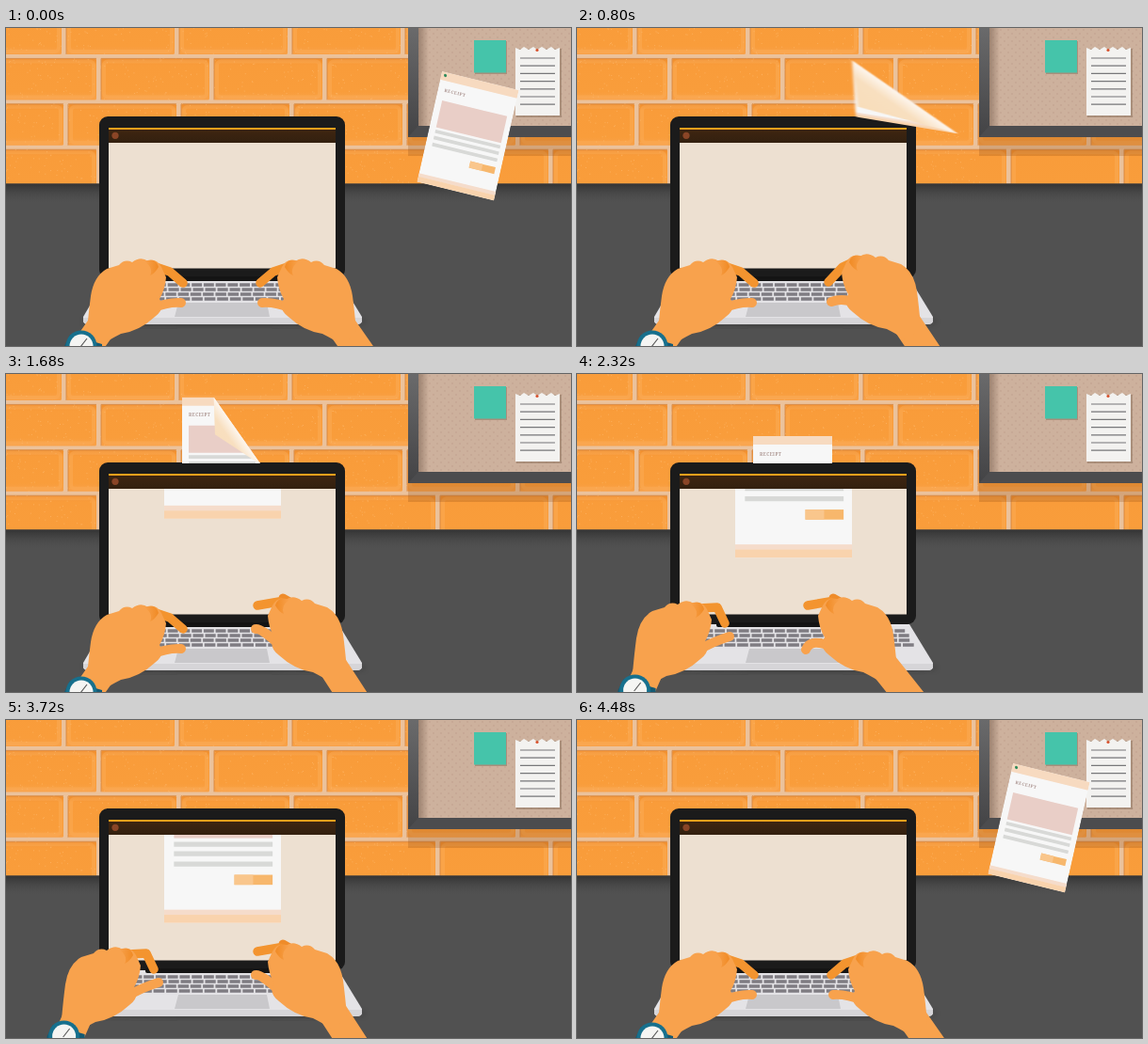
Recreate the animation shown at these times as an HTML page. Size 600 by 338 pixels, loop 4.52 s.

```html
<!DOCTYPE html>
<html lang="en">
<head>
<meta charset="utf-8">
<title>Receipt into laptop</title>
<style>
html, body { margin: 0; width: 100%; height: 100%; overflow: hidden; background: #515151; }
svg { display: block; width: 100vw; height: 100vh; }
</style>
</head>
<body>
<svg viewBox="0 0 600 338" preserveAspectRatio="none">
  <defs>
    <linearGradient id="brick" x2="0" y2="1">
      <stop stop-color="#ee8d2e"/><stop offset=".15" stop-color="#f99c3a"/>
      <stop offset=".8" stop-color="#f99d3b"/><stop offset="1" stop-color="#f8a149"/>
    </linearGradient>
    <linearGradient id="bar" x2="0" y2="1">
      <stop stop-color="#402611"/><stop offset="1" stop-color="#33200f"/>
    </linearGradient>
    <linearGradient id="frameSide" x2="0" y2="1">
      <stop stop-color="#6a6a6b"/><stop offset="1" stop-color="#434345"/>
    </linearGradient>
    <linearGradient id="corkShade">
      <stop stop-color="#6d5545" stop-opacity=".5"/><stop offset="1" stop-color="#6d5545" stop-opacity="0"/>
    </linearGradient>
    <linearGradient id="deskShade" x2="0" y2="1">
      <stop stop-color="#343434"/><stop offset=".4" stop-color="#434343" stop-opacity=".8"/>
      <stop offset="1" stop-color="#515151" stop-opacity="0"/>
    </linearGradient>
    <linearGradient id="flap" x1="1" y1="0" x2="0" y2="1">
      <stop stop-color="#fff"/><stop offset=".5" stop-color="#fdf6ee"/>
      <stop offset=".64" stop-color="#f8dfbf"/><stop offset="1" stop-color="#f8dcb8"/>
    </linearGradient>
    <linearGradient id="finger">
      <stop stop-color="#f8a24d"/><stop offset="1" stop-color="#f08a24"/>
    </linearGradient>
    <pattern id="dots" width="8" height="8" patternUnits="userSpaceOnUse">
      <circle cx="2" cy="2" r=".7" fill="#b39380"/><circle cx="6" cy="6" r=".7" fill="#b39380"/>
    </pattern>
    <filter id="soft" x="-20%" y="-50%" width="140%" height="200%"><feGaussianBlur stdDeviation="3"/></filter>
    <clipPath id="screenClip"><rect x="109" y="122" width="241" height="133"/></clipPath>
    <clipPath id="slotClip"><rect y="-300" width="600" height="395"/></clipPath>
    <clipPath id="foldClip"><polygon id="foldShape"/></clipPath>
    <g id="receipt">
      <rect width="84" height="120" fill="#f7f7f7"/>
      <rect width="84" height="9" fill="#f7dac0"/>
      <text x="7" y="20.5" font-family="'Noto Serif', serif" font-weight="700" font-size="4.6"
        letter-spacing=".45" fill="#ab9490">RECEIPT</text>
      <rect x="7" y="30" width="71" height="29" fill="#e9cec7"/>
      <path d="M7 63.4H78M7 70.2H78M7 77.6H78" stroke="#d8d9d7" stroke-width="3.6"/>
      <rect x="50.5" y="85.4" width="27.5" height="7.2" fill="#f7b76c"/>
      <rect x="50.5" y="85.4" width="13.5" height="7.2" fill="#f9c68c"/>
      <rect y="110.5" width="84" height="4" fill="#f5dccb"/>
      <rect y="114.2" width="84" height="5.8" fill="#f9d3ad"/>
    </g>
  </defs>

  <rect width="600" height="166" fill="#ebc29c"/>
  <g id="wall"></g>
  <path id="specks" stroke="#ffc27c" stroke-width=".9" opacity=".6"/>
  <rect y="165.5" width="600" height="173" fill="#515151"/>
  <rect y="165.5" width="600" height="22" fill="url(#deskShade)"/>

  <rect x="427" y="116" width="173" height="20" fill="#8a4a12" opacity=".24"/>
  <rect x="427" width="173" height="116" fill="#4c4c4e"/>
  <path d="M427 0H438V104L427 116Z" fill="url(#frameSide)"/>
  <rect x="438" width="162" height="104" fill="#cdb19d"/>
  <rect x="438" width="162" height="104" fill="url(#dots)" opacity=".7"/>
  <rect x="438" width="11" height="104" fill="url(#corkShade)"/>
  <rect x="498" y="14" width="34" height="35" fill="#775c49" opacity=".4"/>
  <rect x="497" y="13" width="34" height="34.5" fill="#45c4aa"/>
  <path d="M542 22H590V95H542Z" fill="#775c49" opacity=".4"/>
  <path d="M541 21l5 2 4-3 5 3 5-3 4 3 5-3 5 3 5-3 4 3 5-2V93H541Z" fill="#f3f2f0"/>
  <path id="noteLines" stroke="#77777a" stroke-width="1.2"/>
  <circle cx="564" cy="23.5" r="1.6" fill="#d9532f"/>

  <g id="laptop">
    <ellipse cx="232" cy="312" rx="150" ry="4" fill="#222" opacity=".5" filter="url(#soft)"/>
    <path d="M106 266H353L378 307V311Q378 315 372 315H88Q82 315 82 311V307Z" fill="#e4e3e6"/>
    <path d="M82 308H378V311Q378 315 372 315H88Q82 315 82 311Z" fill="#d6d5d8"/>
    <path id="keys" fill="#7f7c82"/>
    <path d="M183 292H277L280 307H179Z" fill="#c9c8cb"/>
    <rect x="99" y="94" width="261" height="172" rx="9" fill="#1b1b1b"/>
    <rect x="148" y="264" width="164" height="5" rx="2" fill="#141414"/>
    <rect x="109" y="106" width="241" height="149.5" fill="#ede0d1"/>
    <rect x="109" y="106" width="241" height="16" fill="url(#bar)"/>
    <rect x="109" y="106" width="241" height="2" fill="#f5a01c"/>
    <circle cx="116" cy="114.3" r="3.6" fill="#8a4526"/>
    <g clip-path="url(#screenClip)"><use href="#receipt" id="page"/></g>
  </g>

  <g id="slot">
    <g id="paper">
      <g clip-path="url(#foldClip)"><use href="#receipt"/></g>
      <polygon id="flapShape" fill="url(#flap)"/>
      <circle id="pin" cx="4.5" cy="3.5" r="1.6" fill="#2f8a5c"/>
    </g>
  </g>

  <g id="left"></g>
  <g id="right" transform="translate(458) scale(-1 1)"></g>
</svg>
<script>
const LOOP = 4520;
const $ = id => document.getElementById(id);
const set = (el, attrs) => { for (const k in attrs) el.setAttribute(k, attrs[k]); };
const add = (parent, tag, attrs) => {
  const el = document.createElementNS('http://www.w3.org/2000/svg', tag);
  set(el, attrs);
  return parent.appendChild(el);
};
const mix = (a, b, u) => a + (b - a) * u;
const linear = (t, from, to) => Math.min(1, Math.max(0, (t - from) / (to - from)));
const ramp = (t, from, to) => { const u = linear(t, from, to); return u * u * (3 - 2 * u); };

function buildScenery() {
  for (let row = 0; row < 4; row++) {
    const y = -16 + row * 48.4;
    for (let x = row % 2 ? -139 : -176 + row; x < 600; x += 120) {
      add($('wall'), 'rect', { x, y, width: 115, height: 44, rx: 1.5, fill: 'url(#brick)' });
      add($('wall'), 'rect', { x: x + 3, y: y + 3, width: 109, height: 38, rx: 4,
        fill: 'none', stroke: '#fbb163', 'stroke-width': 4, opacity: .35 });
      add($('wall'), 'path', { d: `M${x} ${y + 44}V${y}H${x + 115}`, fill: 'none', stroke: '#d98d4a' });
    }
  }
  let seed = 7, d = '';
  const rnd = () => (seed = seed * 16807 % 2147483647) / 2147483647;
  for (let i = 0; i < 900; i++) d += `M${(rnd() * 427).toFixed(1)} ${(rnd() * 165).toFixed(1)}h.9`;
  set($('specks'), { d });

  d = '';
  for (let i = 0; i < 7; i++) d += `M546 ${(32 + i * 8.2).toFixed(1)}H583`;
  set($('noteLines'), { d });

  d = '';
  for (let r = 0; r < 4; r++) {
    const x0 = 108 - r * 2.5, w = (458 - 2 * x0) / 19;
    for (let c = 0; c < 19; c++) {
      const x = x0 + c * w + (r % 2 ? 2 : 0);
      d += `M${x.toFixed(1)} ${271.3 + r * 5}h${(w - 1.8).toFixed(1)}v3.5h${(1.8 - w).toFixed(1)}z`;
    }
  }
  set($('keys'), { d });
}

const PALM = 'M86 322Q88 300 90 285Q93 264 107 256L120 252Q126 245 134 249Q143 242 151 248' +
  'Q159 244 165 254L170 265Q169 278 163 288Q170 298 158 307Q142 322 122 325Q108 332 100 338Z';

// Draws a left hand; the wrist follows the palm only partly.
function makeHand(root, withWatch) {
  const limb = (parent, stroke, width) => add(parent, 'path', { fill: 'none', stroke,
    'stroke-width': width, 'stroke-linecap': 'round', 'stroke-linejoin': 'round' });
  const forearm = limb(root, '#f8a24d', 31);
  const palm = add(root, 'g', {});
  const middle = limb(palm, '#ef8c2a', 9);
  const index = limb(palm, '#f3942f', 9.5);
  const thumb = limb(palm, '#f8a24d', 10);
  add(palm, 'path', { d: PALM, fill: '#f8a24d' });
  add(palm, 'path', { d: 'M147 248Q159 243 162 254Q158 261 153 263Q157 255 147 248Z', fill: 'url(#finger)' });
  const watch = add(root, 'g', {});
  if (withWatch) {
    add(watch, 'path', { d: 'M-18 0L-12 -12L22 -2V12H-20Z', fill: '#155a73' });
    add(watch, 'circle', { r: 16.5, fill: '#17708d' });
    add(watch, 'circle', { r: 12.5, fill: '#f5f5f3' });
    add(watch, 'path', { d: 'M-1 1L6 -8', stroke: '#555', 'stroke-width': 1.1 });
  }
  return ({ x, y, joint, tip, bend, thumbTip, point = 0 }) => {
    const wrist = 80 + x * .68;
    set(palm, { transform: `translate(${x} ${y})` });
    set(forearm, { d: `M${108 + x} ${308 + y}L${wrist} 348` });
    set(watch, { transform: `translate(${wrist} ${338 + y / 2})` });
    set(index, { d: `M156 253L${joint}L${tip}` });
    set(middle, { d: `M140 254L${mix(145, 154, point)} ${mix(254, 246, point)}` });
    set(thumb, { d: `M155 298Q${bend} ${thumbTip}` });
  };
}

const blend = (a, b, u) => a.map((v, i) => mix(v, b[i], u));

function leftPose(t, tap) {
  const away = ramp(t, 1700, 2240) - ramp(t, 3720, 4400);
  return {
    x: -27 * away, y: -4 * away,
    joint: blend([174, 259], [176, 252], away),
    tip: blend([188, 271 + tap], [184, 269], away),
    bend: [172, 291 - 3 * away],
    thumbTip: [186 + 3 * away, 292 - 9 * away]
  };
}

function rightPose(t, tap) {
  const swipe = ramp(t, 1200, 1660) - ramp(t, 3880, 4400);
  const lean = ramp(t, 200, 800) - ramp(t, 3880, 4400);
  const x = 7 * lean + 3 * swipe + 22 * (ramp(t, 1680, 2320) - ramp(t, 2860, 3640))
    - 15 * (ramp(t, 3720, 3900) - ramp(t, 3900, 4400));
  return {
    x, y: -5 * lean - 3 * swipe, point: swipe,
    joint: blend([174 - 5 * lean, 259], [158, 250], swipe),
    tip: blend([188 - 4 * lean, 271 + 4 * lean - tap], [181, 254], swipe),
    bend: blend([172 - 4 * lean, 291], [178, 272 + x / 2], swipe),
    thumbTip: blend([186 - 5 * lean, 292 + 4 * lean], [183, 269 + x], swipe)
  };
}

// Matrices of the paper: on the board, and what a gust adds halfway through the flight.
const BOARD = [.972, .237, -.221, .979, 463, 46];
const GUST = [.3, .095, .143, -.49, -32, 62];
const HOVER = -100;

function drawPaper(t) {
  const away = ramp(t, 560, 1040) - ramp(t, 4080, 4440);
  const gust = Math.sin(Math.PI * away);
  const top = HOVER + 113 * ramp(t, 1000, 1500) + 84 * linear(t, 1500, 2800) - 197 * ramp(t, 3760, 4220);
  const matrix = blend(BOARD, [1, 0, 0, 1, 187, top], away).map((v, i) => v + GUST[i] * gust);
  set($('paper'), { transform: `matrix(${matrix})` });
  $('paper').style.filter = gust > .05 ? `blur(${1.4 * gust}px)` : 'none';
  $('slot').style.clipPath = away === 1 ? 'url(#slotClip)' : 'none';
  $('pin').style.display = away === 0 ? '' : 'none';

  // The top right corner folds over a line that sweeps towards the diagonal.
  const fold = t < 3000 ? ramp(t, 560, 800) - .4 * ramp(t, 800, 1100) - .6 * ramp(t, 1680, 2000) : .8 * gust;
  const W = 84, H = 120, x = W * (1 - fold), y = H * fold;
  const n = H * H + W * W, foot = [W - W * fold * H * H / n, W * fold * W * H / n];
  const tip = [mix(foot[0], 2 * foot[0] - W, .45), foot[1] * 1.45 + 40 * fold ** 4];
  set($('foldShape'), { points: `0,0 ${x},0 ${W},${y} ${W},${H} 0,${H}` });
  set($('flapShape'), { points: `${x},0 ${W},${y} ${tip}` });

  const bottom = top + 129 - 10.5 * ramp(t, 2400, 3200);
  set($('page'), { transform: `translate(168 ${bottom - 177}) scale(1.476)` });
}

buildScenery();
const drawLeft = makeHand($('left'), true);
const drawRight = makeHand($('right'), false);

function draw(t) {
  const tap = t < 1200 ? 2.5 * Math.sin(t * Math.PI / 100) : 0;
  drawPaper(t);
  drawLeft(leftPose(t, tap));
  drawRight(rightPose(t, tap));
}

const start = performance.now();
function frame() {
  draw((performance.now() - start) % LOOP);
  requestAnimationFrame(frame);
}
frame();
</script>
</body>
</html>
```
